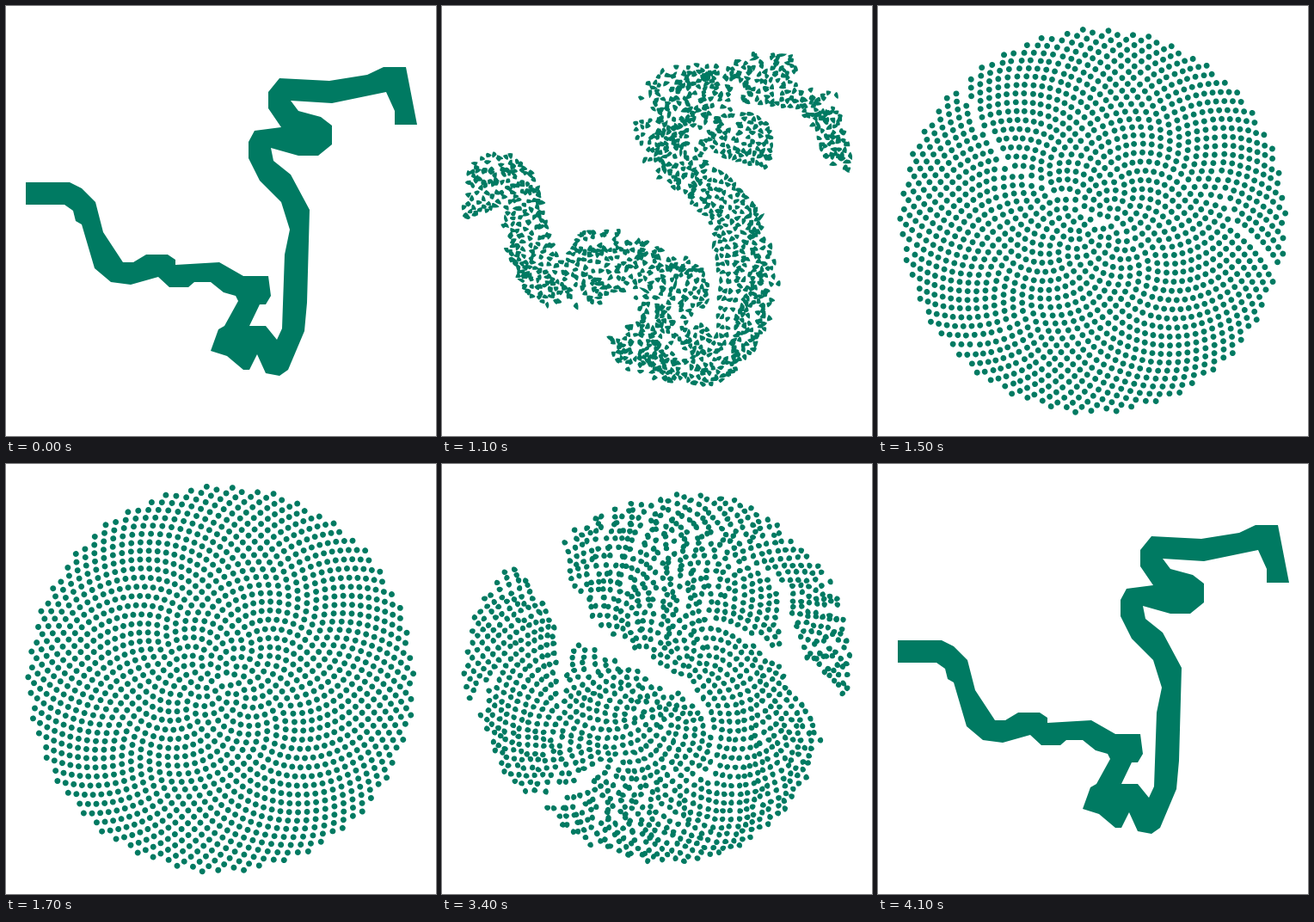
Animation of 500x500 px, one loop 4800 ms. Source, as an HTML page with a canvas:

```html
<!DOCTYPE html>
<html lang="en">
<head>
<meta charset="utf-8">
<title>Route to sunflower</title>
<style>
  html, body { margin: 0; width: 100%; height: 100%; overflow: hidden; background: #fff; }
  canvas { display: block; width: 100%; height: 100%; }
</style>
</head>
<body>
<canvas width="500" height="500"></canvas>
<script>
const ctx = document.querySelector('canvas').getContext('2d');

const COLOR = '#007a62';
const COUNT = 1528;
const SIDES = 14;
const CENTER = 250.4, SPREAD = 5.75, DOT = 3.5;
const LOOP = 4800, STEP = 100, STEPS = 11, OUT = 700, BACK = 3100;

// The two banks of the route
const upper = [
  23,205, 74,205, 88,212, 104,228, 113,263, 136,298, 148,298, 163,289, 188,289, 197,295,
  197,301, 248,298, 276,314, 305,314, 308,337, 302,347, 295,347, 283,372, 302,372, 315,388,
  321,375, 324,289, 330,260, 320,228, 295,203, 282,177, 282,158, 289,145, 320,141, 305,119,
  305,100, 318,84, 376,87, 420,80, 439,71, 465,71
];
const lower = [
  478,138, 452,138, 452,122, 442,100, 379,113, 331,110, 340,122, 366,129, 379,139, 379,161,
  363,174, 340,174, 308,165, 311,180, 331,196, 353,237, 350,345, 347,378, 328,423, 318,430,
  302,427, 292,405, 283,423, 276,423, 257,407, 238,401, 247,376, 254,372, 270,343, 267,337,
  253,333, 238,321, 219,321, 212,327, 190,327, 177,315, 145,324, 122,321, 103,305, 88,254,
  81,250, 78,238, 68,231, 23,231
];

let seed = 7;
function random() {
  seed = (seed * 1664525 + 1013904223) >>> 0;
  return seed / 4294967296;
}

const pairs = list => list.flatMap((v, i) => i % 2 ? [] : [[v, list[i + 1]]]);
const cross = (a, b, c) => (b[0] - a[0]) * (c[1] - a[1]) - (b[1] - a[1]) * (c[0] - a[0]);
const mix = (a, b, t) => a + (b - a) * t;
const mixPoint = (a, b, t) => [mix(a[0], b[0], t), mix(a[1], b[1], t)];
const dist = (a, b) => Math.hypot(a[0] - b[0], a[1] - b[1]);

function measure(poly) {
  let area = 0, x = 0, y = 0;
  const o = poly[0];
  for (let i = 1; i < poly.length - 1; i++) {
    const a = cross(o, poly[i], poly[i + 1]) / 2;
    area += a;
    x += a * (o[0] + poly[i][0] + poly[i + 1][0]) / 3;
    y += a * (o[1] + poly[i][1] + poly[i + 1][1]) / 3;
  }
  return { poly, area, mid: area > 1e-9 ? [x / area, y / area] : o };
}

// Ear clipping
function triangulate(outline) {
  const rest = outline.slice(), out = [];
  while (rest.length > 3) {
    const n = rest.length;
    let best = -1, bestSize = Infinity;
    for (let i = 0; i < n; i++) {
      const a = rest[(i + n - 1) % n], b = rest[i], c = rest[(i + 1) % n];
      if (cross(a, b, c) <= 0) continue;
      const blocked = rest.some(p => p !== a && p !== b && p !== c &&
        cross(a, b, p) >= 0 && cross(b, c, p) >= 0 && cross(c, a, p) >= 0);
      if (!blocked && dist(a, c) < bestSize) { best = i; bestSize = dist(a, c); }
    }
    if (best < 0) break;
    out.push([rest[(best + n - 1) % n], rest[best], rest[(best + 1) % n]]);
    rest.splice(best, 1);
  }
  out.push(rest);
  return out;
}

// Cut a convex piece in two, across its longest extent
function cut({ poly, mid }) {
  let far = 0, angle = 0;
  for (const a of poly) for (const b of poly) {
    const d = dist(a, b);
    if (d > far) { far = d; angle = Math.atan2(b[1] - a[1], b[0] - a[0]); }
  }
  angle += (random() - 0.5) * 0.9;
  const nx = Math.cos(angle), ny = Math.sin(angle);
  const side = p => (p[0] - mid[0]) * nx + (p[1] - mid[1]) * ny;
  const left = [], right = [];
  poly.forEach((p, i) => {
    const q = poly[(i + 1) % poly.length], s = side(p), e = side(q);
    (s < 0 ? left : right).push(p);
    if ((s < 0) !== (e < 0)) {
      const m = mixPoint(p, q, s / (s - e));
      left.push(m);
      right.push(m);
    }
  });
  return [measure(left), measure(right)];
}

function shatter(outline, count) {
  const pieces = triangulate(outline).map(measure);
  while (pieces.length < count) {
    let big = 0;
    pieces.forEach((p, i) => { if (p.area > pieces[big].area) big = i; });
    const [a, b] = cut(pieces[big]);
    pieces[big] = a;
    pieces.push(b);
  }
  return pieces;
}

// Cheapest pairing (Hungarian method); returns the row given to each column
function assign(rows, cols) {
  const n = rows.length;
  const cost = rows.map(r => Float64Array.from(cols, c => dist(r, c)));
  const u = new Float64Array(n), v = new Float64Array(n).fill(Infinity);
  const owner = new Int32Array(n).fill(-1), open = [];
  for (const row of cost) for (let j = 0; j < n; j++) if (row[j] < v[j]) v[j] = row[j];
  for (let i = 0; i < n; i++) {
    let best = 0;
    for (let j = 1; j < n; j++) if (cost[i][j] - v[j] < cost[i][best] - v[best]) best = j;
    u[i] = cost[i][best] - v[best];
    if (owner[best] < 0) owner[best] = i; else open.push(i);
  }
  const gap = new Float64Array(n), from = new Int32Array(n), todo = new Int32Array(n);
  for (const start of open) {
    gap.fill(Infinity);
    for (let j = 0; j < n; j++) todo[j] = j;
    let left = n, i = start, prev = -1, reach = 0, end = -1;
    while (end < 0) {
      const row = cost[i], base = reach - u[i];
      let low = Infinity, pick = 0;
      for (let k = 0; k < left; k++) {
        const j = todo[k], d = base + row[j] - v[j];
        if (d < gap[j]) { gap[j] = d; from[j] = prev; }
        if (gap[j] < low) { low = gap[j]; pick = k; }
      }
      const j = todo[pick];
      todo[pick] = todo[--left];
      todo[left] = j;
      reach = low;
      if (owner[j] < 0) end = j; else { i = owner[j]; prev = j; }
    }
    u[start] += reach;
    for (let k = left; k < n; k++) {
      const j = todo[k], d = reach - gap[j];
      v[j] -= d;
      if (owner[j] >= 0) u[owner[j]] += d;
    }
    for (let j = end; j >= 0; j = from[j]) owner[j] = from[j] < 0 ? start : owner[from[j]];
  }
  return owner;
}

// Add corners on the longest edges until there are enough
function refine(poly) {
  const pts = poly.slice();
  while (pts.length < SIDES) {
    let at = 0, long = -1;
    pts.forEach((p, i) => {
      const d = dist(p, pts[(i + 1) % pts.length]);
      if (d > long) { long = d; at = i; }
    });
    pts.splice(at + 1, 0, mixPoint(pts[at], pts[(at + 1) % pts.length], 0.5));
  }
  return pts;
}

function ring([x, y], count, start) {
  return Array.from({ length: count }, (_, i) => {
    const a = start + i * 2 * Math.PI / count;
    return [x + DOT * Math.cos(a), y + DOT * Math.sin(a)];
  });
}

const GOLDEN = Math.PI * (3 - Math.sqrt(5));
const dots = Array.from({ length: COUNT }, (_, i) => {
  const n = i + 1, r = SPREAD * Math.sqrt(n);
  return [CENTER + r * Math.cos(n * GOLDEN), CENTER - r * Math.sin(n * GOLDEN)];
});

const route = pairs([...upper, ...lower]);
const pieces = shatter(route, COUNT);
const owner = assign(dots, pieces.map(p => p.mid));
const morphs = pieces.map(({ poly, mid }, i) => {
  const from = refine(poly);
  const start = Math.atan2(from[0][1] - mid[1], from[0][0] - mid[0]);
  return { from, to: ring(dots[owner[i]], from.length, start) };
});

function trace(pts) {
  pts.forEach((p, i) => i ? ctx.lineTo(p[0], p[1]) : ctx.moveTo(p[0], p[1]));
  ctx.closePath();
}

function draw(p) {
  ctx.fillStyle = '#fff';
  ctx.fillRect(0, 0, 500, 500);
  ctx.fillStyle = COLOR;
  ctx.beginPath();
  if (p === 0) trace(route);
  else for (const { from, to } of morphs) trace(from.map((a, i) => mixPoint(a, to[i], p)));
  ctx.fill();
}

const ease = t => t < 0.5 ? 4 * t ** 3 : 1 - 4 * (1 - t) ** 3;

function stage(ms, begin) {
  const k = Math.floor((ms - begin) / STEP) + 1;
  return ease(Math.min(Math.max(k, 0), STEPS) / STEPS);
}

let shown = -1;
const t0 = performance.now();
function frame() {
  const ms = (performance.now() - t0) % LOOP;
  const p = ms < BACK ? stage(ms, OUT) : 1 - stage(ms, BACK);
  if (p !== shown) draw(shown = p);
  requestAnimationFrame(frame);
}
frame();
</script>
</body>
</html>
```
